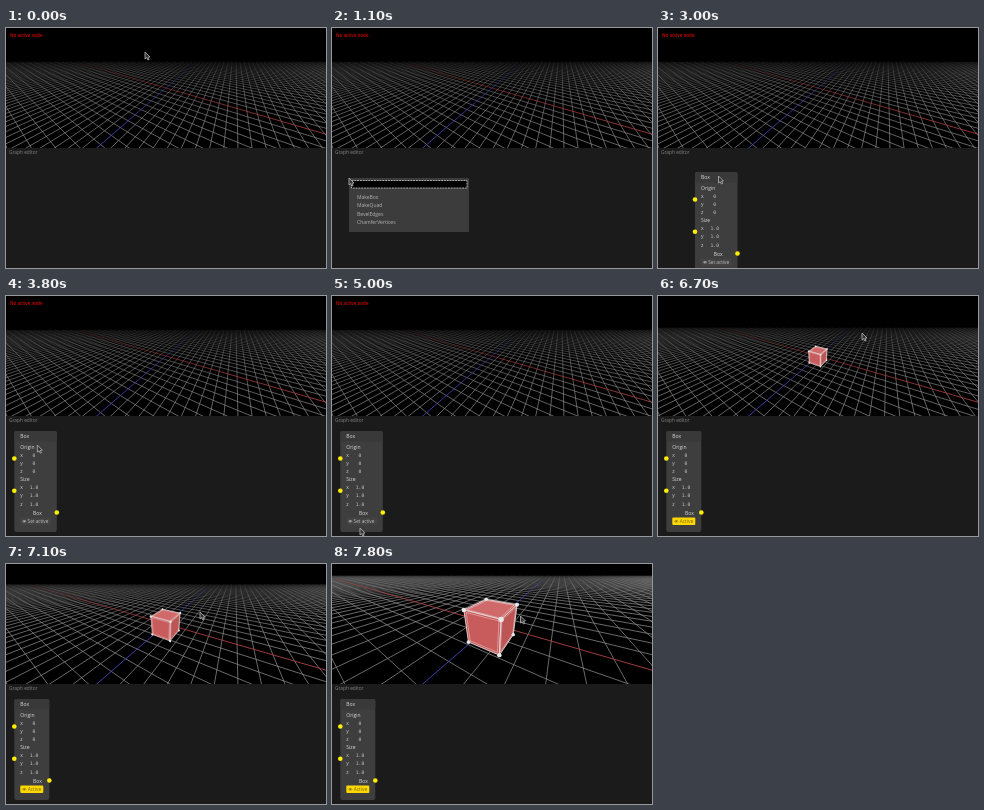
These frames come from a looping animation (320x240 px, 8000 ms). An HTML page with a canvas:

```html
<!DOCTYPE html>
<html>
<head>
<meta charset="utf-8">
<style>
html, body { margin: 0; width: 100%; height: 100%; overflow: hidden; background: #000; }
canvas { display: block; width: 320px; height: 240px; }
</style>
</head>
<body>
<canvas id="stage" width="320" height="240"></canvas>
<script>
const ctx = document.getElementById('stage').getContext('2d');
const LOOP = 8000, STEP = 100;
const SANS = '"Open Sans", "Noto Sans", sans-serif';
const MONO = '"DejaVu Sans Mono", monospace';

// Camera: orbits the origin, pitch 30°, vertical field of view 60°.
const FOCAL = 104, COS = Math.cos(Math.PI / 6), SIN = 0.5, FAR = 15;
// Ground axes as [right, forward] seen from the camera.
const RED_AXIS = [-COS, SIN], BLUE_AXIS = [SIN, COS];

const cursorPath = [
  [0, 139, 24], [300, 139, 24], [900, 15, 151], [1000, 17, 150], [1200, 17, 150],
  [1600, 35, 164], [2300, 35, 164], [2500, 40, 155], [3000, 60.5, 148], [3100, 60.5, 148],
  [3600, 31.5, 140], [3700, 31.5, 140], [4600, 30, 222], [5000, 28, 232], [5100, 28, 232],
  [5300, 27, 224], [5900, 27, 224], [6600, 206, 37], [6700, 204, 37], [7100, 194, 48],
  [7600, 189, 52], [7700, 189, 52], [7800, 188.5, 52]
];
const nodePath = [[2400, 17, 150], [2500, 17, 150], [3000, 37, 144], [3100, 37, 144], [3600, 8.3, 135]];

function along(path, t) {
  const i = path.findIndex(p => p[0] > t);
  if (i < 0) return path[path.length - 1].slice(1);
  if (i === 0) return path[0].slice(1);
  const [t0, x0, y0] = path[i - 1], [t1, x1, y1] = path[i];
  const k = (t - t0) / (t1 - t0);
  return [x0 + (x1 - x0) * k, y0 + (y1 - y0) * k];
}

function rect(x, y, w, h, fill, radius = 0) {
  ctx.fillStyle = fill;
  ctx.beginPath();
  ctx.roundRect(x, y, w, h, radius);
  ctx.fill();
}

function text(str, x, y, color = '#c0c0c0', size = 5, font = SANS, weight = 400) {
  ctx.font = `${weight} ${size}px ${font}`;
  ctx.fillStyle = color;
  ctx.fillText(str, x, y);
}

function dot(x, y, r, fill) {
  ctx.fillStyle = fill;
  ctx.beginPath();
  ctx.arc(x, y, r, 0, 7);
  ctx.fill();
}

function polygon(points, fill, stroke, width) {
  ctx.beginPath();
  points.forEach(p => ctx.lineTo(p[0], p[1]));
  ctx.closePath();
  if (fill) { ctx.fillStyle = fill; ctx.fill(); }
  if (stroke) { ctx.strokeStyle = stroke; ctx.lineWidth = width; ctx.stroke(); }
}

function project(right, up, forward, dist) {
  const z = dist + forward * COS - up * SIN;
  return [160 + FOCAL * right / z, 60 - FOCAL * (forward * SIN + up * COS) / z, z];
}

function groundLine(dir, side, offset, dist) {
  const ends = [0.3, FAR].map(z => {
    const s = ((z - dist) / COS - offset * side[1]) / dir[1];
    return project(offset * side[0] + s * dir[0], 0, offset * side[1] + s * dir[1], dist);
  });
  ctx.moveTo(ends[0][0], ends[0][1]);
  ctx.lineTo(ends[1][0], ends[1][1]);
}

function drawGrid(dist) {
  const edge = 60 * dist / FAR;
  const strokeLines = (rgb, width, build) => {
    // Brightness falls off linearly with depth.
    const fade = ctx.createLinearGradient(0, edge, 0, edge * 4);
    for (const k of [0, 0.1, 0.3, 0.6, 1])
      fade.addColorStop(k, `rgba(${rgb},${0.1 + 1.2 * (1 - 1 / (1 + 3 * k))})`);
    ctx.strokeStyle = fade;
    ctx.lineWidth = width;
    ctx.beginPath();
    build();
    ctx.stroke();
  };
  strokeLines('140,140,140', 0.75, () => {
    for (let k = -30; k <= 30; k += 0.5) {
      if (!k) continue;
      groundLine(RED_AXIS, BLUE_AXIS, k, dist);
      groundLine(BLUE_AXIS, RED_AXIS, k, dist);
    }
  });
  strokeLines('175,65,65', 0.9, () => groundLine(RED_AXIS, BLUE_AXIS, 0, dist));
  strokeLines('70,70,185', 0.9, () => groundLine(BLUE_AXIS, RED_AXIS, 0, dist));
}

function drawCube(dist) {
  const vertex = (a, b, up) => project(
    a * RED_AXIS[0] + b * BLUE_AXIS[0], up, a * RED_AXIS[1] + b * BLUE_AXIS[1], dist);
  const h = 0.5;
  const ring = up => [vertex(h, h, up), vertex(h, -h, up), vertex(-h, -h, up), vertex(-h, h, up)];
  const top = ring(h), low = ring(-h);
  const faces = [
    [top, '#d06a6a'],
    [[top[1], top[2], low[2], low[1]], '#c85c5c'],
    [[top[2], top[3], low[3], low[2]], '#bd5555']
  ];
  const lineWidth = Math.max(0.6, 2.5 / dist);
  for (const [points, fill] of faces) {
    polygon(points, fill, '#e4e4e4', lineWidth);
    const cx = points.reduce((s, p) => s + p[0], 0) / 4;
    const cy = points.reduce((s, p) => s + p[1], 0) / 4;
    const inset = points.map(p => [cx + (p[0] - cx) * 0.88, cy + (p[1] - cy) * 0.88]);
    polygon(inset, null, 'rgba(255,225,225,0.75)', lineWidth * 0.65);
  }
  for (const [x, y, z] of [...top, ...low.slice(1)])
    dot(x, y, Math.max(0.9, 0.055 * FOCAL / z), '#e8e8e8');
}

function drawMenu(t) {
  rect(17, 150, 120, 54, '#3c3c3c', 1);
  rect(19.5, 152.5, 115.5, 7.5, '#000');
  ctx.strokeStyle = '#d0d0d0';
  ctx.lineWidth = 0.8;
  ctx.setLineDash([2, 0.8]);
  ctx.strokeRect(19.5, 152.5, 115.5, 7.5);
  ctx.setLineDash([]);
  if (t >= 1500) rect(22, 164, 104, 9.5, t >= 2100 ? '#5c5c5c' : '#4b4b4b', 1);
  ['MakeBox', 'MakeQuad', 'BevelEdges', 'ChamferVertices'].forEach((name, i) =>
    text(name, 25, 170.7 + i * 8.4, i === 0 && t >= 1500 ? '#eee' : '#b4b4b4'));
}

function eye(x, y, color) {
  ctx.strokeStyle = color;
  ctx.lineWidth = 0.5;
  ctx.beginPath();
  ctx.ellipse(x, y, 1.7, 0.9, 0, 0, 7);
  ctx.stroke();
  dot(x, y, 0.7, color);
}

function drawNode(t) {
  const active = t >= 6000;
  const width = active ? 35 : 42.5;
  const [x, y] = along(nodePath, t);
  ctx.save();
  ctx.translate(x, y);
  rect(0, 0, width, 101, '#3e3e3e', 2);
  rect(0, 0, width, 10.5, '#393939', 2);
  text('Box', 6, 7, '#ddd');
  const vector = (label, value, top) => {
    text(label, 6, top, '#dcdcdc');
    ['x', 'y', 'z'].forEach((axis, i) => {
      const base = top + 7.8 + i * 8.3;
      text(axis, 6, base, '#d0d0d0');
      text(value, value.length > 1 ? 15.5 : 18.3, base, '#c8c8c8', 4.7, MONO);
    });
    dot(0, top + 9.5, 2.3, '#ffee00');
  };
  vector('Origin', '0', 18);
  vector('Size', '1.0', 50.3);
  text('Box', 18.8, 83.5, '#dcdcdc');
  dot(width, 81.5, 2.3, '#ffee00');
  if (active) {
    rect(6, 86.5, 23, 7.5, '#ffd700', 1);
    eye(10, 90.3, '#7a6500');
    text('Active', 13.5, 92, '#7a6500', 4.8);
  } else {
    const hover = (t >= 4600 && t < 4900) || t >= 5200;
    rect(6, 86.5, 31, 7.5, t >= 5500 ? '#5c5c5c' : hover ? '#505050' : '#434343', 1);
    eye(10, 90.3, '#c0c0c0');
    text('Set active', 13.3, 92, hover ? '#eee' : '#c0c0c0', 4.7);
  }
  ctx.restore();
}

function drawCursor(t) {
  const [x, y] = along(cursorPath, t);
  const shape = [[0, 0], [0, 7], [1.7, 5.6], [2.9, 8], [4.1, 7.5], [3, 5.2], [5, 5]];
  polygon(shape.map(p => [x + p[0], y + p[1]]), '#333', '#b8b8b8', 0.8);
}

function draw(t) {
  // The wheel zoom shrinks the distance by a constant factor per step.
  const zoomTime = Math.min(t, 7600);
  const dist = Math.min(8.5, 5.1 * 0.895 ** ((zoomTime - 7100) / 100));
  ctx.fillStyle = '#000';
  ctx.fillRect(0, 0, 320, 240);
  ctx.save();
  ctx.beginPath();
  ctx.rect(0, 0, 320, 120);
  ctx.clip();
  drawGrid(dist);
  if (t >= 6000) drawCube(dist);
  else text('No active node', 4, 8.6, '#d00000', 4.5, SANS, 600);
  ctx.restore();

  rect(0, 120, 320, 120, '#1b1b1b');
  text('Graph editor', 3, 125.6, '#858585', 4.8);
  if (t >= 1000 && t < 2400) drawMenu(t);
  if (t >= 2400) drawNode(t);
  drawCursor(t);
}

function tick() {
  const t = performance.now() % LOOP;
  draw(Math.floor(t / STEP) * STEP);
  requestAnimationFrame(tick);
}
tick();
</script>
</body>
</html>
```
